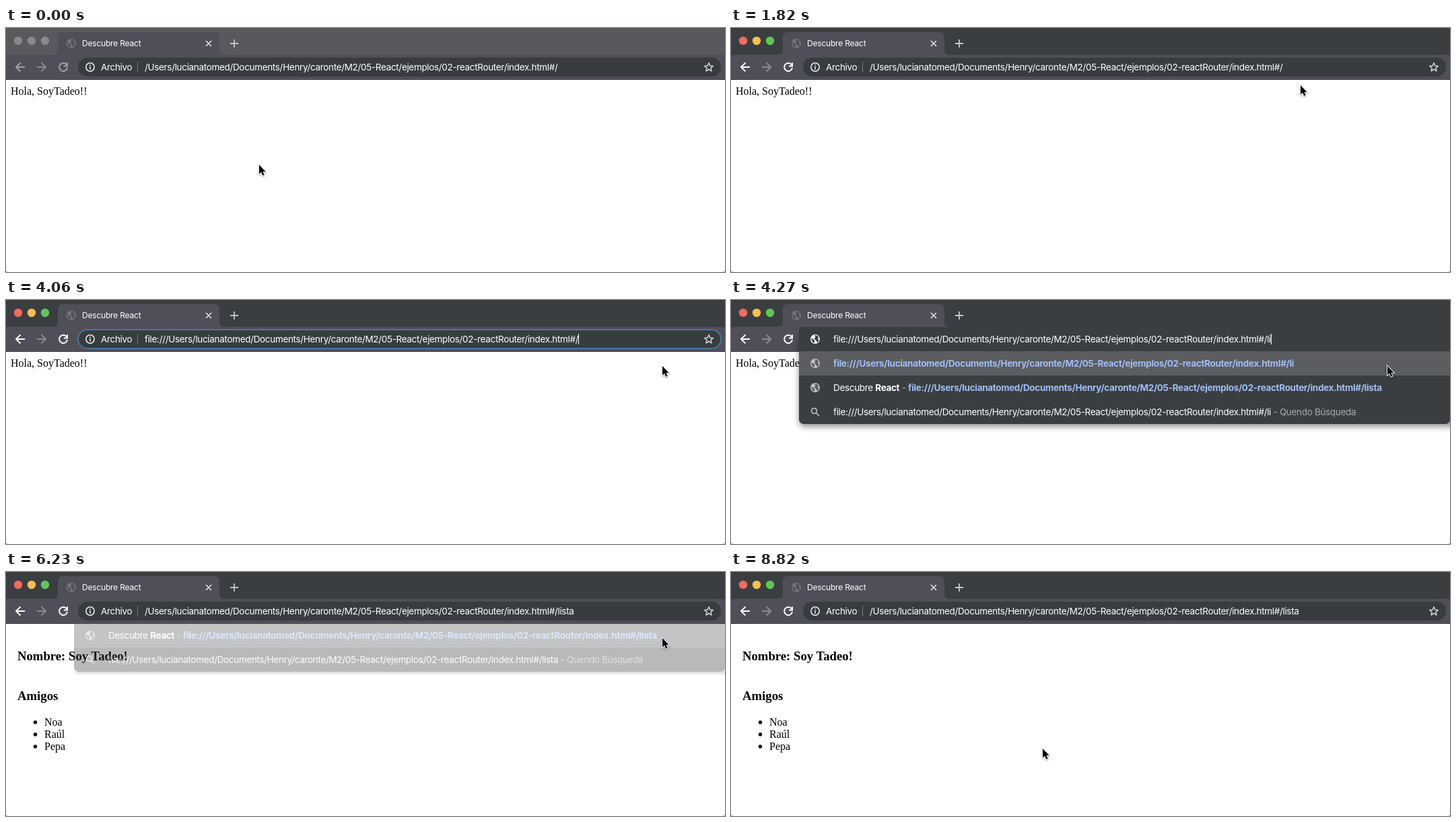
Write an HTML page that moves like this. It is 1068 by 362 pixels and loops after 8960 ms.

```html
<!DOCTYPE html>
<html lang="es">
<head>
<meta charset="utf-8">
<title>Descubre React</title>
<style>
html, body { margin: 0; width: 100%; height: 100%; overflow: hidden; background: #fff; }
svg { display: block; width: 1068px; height: 362px; }
text { white-space: pre; }
.ui { font: 400 13.5px Inter, sans-serif; letter-spacing: -.33px; fill: #fff; }
.tab { font-size: 12px; letter-spacing: -.2px; }
.bold { font-weight: 700; }
.link { fill: #a0bdf6; }
.dim { fill: #a9abad; }
.page { font: 16px "Liberation Serif", serif; }
.page .head { font-weight: bold; font-size: 18.72px; }
.line { fill: none; stroke-width: 2; }
</style>
</head>
<body>
<svg viewBox="0 0 1068 362">
  <defs>
    <filter id="blur" x="-10%" y="-20%" width="120%" height="160%"><feGaussianBlur stdDeviation="5"/></filter>
    <g id="globe">
      <circle r="7"/>
      <path fill="var(--land)" d="M-5.6 -1.5L-2.6 .4 -.6 2.4 -1.3 5.5Q-5.6 4.5 -5.6 -1.5ZM-1 -5.7Q3.5 -6 5 -2.5L3.4 -.8 5.6 1.2Q5 4 3 5L1.5 1.8 -1.6 -.6 .6 -2.8Z"/>
    </g>
  </defs>

  <g class="page">
    <text id="hello" x="7" y="99">Hola, SoyTadeo!!</text>
    <g id="list">
      <text class="head" x="17" y="131">Nombre: Soy Tadeo!</text>
      <text class="head" x="17" y="190">Amigos</text>
    </g>
  </g>

  <rect id="strip" width="1068" height="40"/>
  <g id="lights"></g>
  <path fill="#504e58" d="M0 40H69Q77 40 77 32V14Q77 6 85 6H309Q317 6 317 14V32Q317 40 325 40H1068V77H0Z"/>
  <path fill="#414148" d="M0 76H1068V77H0Z"/>
  <use href="#globe" x="97" y="23" fill="#75747b" style="--land:#504e58"/>
  <text class="ui tab" x="113" y="27">Descubre React</text>
  <path class="line" stroke="#e4e4e6" style="stroke-width:1.6" d="M297 19l8 8M305 19l-8 8"/>
  <path class="line" stroke="#c4c6c8" style="stroke-width:1.8" d="M333 23h12M339 17v12"/>
  <g id="nav" class="line">
    <path d="M28 58H15M21.5 51.5L15 58l6.500 6.500"/>
    <path d="M90 54.500A6 6 0 1 0 91 59M91 51.500v5h-5"/>
  </g>
  <path class="line" stroke="#8b8991" d="M46 58H59M52.500 51.500L59 58l-6.500 6.500"/>

  <rect id="box" x="107" y="44" width="955" height="28" rx="14" fill="#383c3f" stroke-width="2"/>
  <g id="info">
    <circle class="line" cx="125" cy="58" r="6.200" stroke="#f0f0f0" style="stroke-width:1.500"/>
    <path fill="#f0f0f0" d="M124.200 57h1.600v4.500h-1.600zM124.200 54.200h1.600v1.600h-1.600z"/>
    <text class="ui" x="141" y="63">Archivo</text>
    <path fill="#77797c" d="M195 50h1v16h-1z"/>
    <path class="line" stroke="#d3d4d5" style="stroke-width:1.500" stroke-linejoin="round" d="M1044 51.800l1.800 4.200 4.600.4-3.500 3 1.100 4.500-4-2.400-4 2.400 1.100-4.500-3.500-3 4.600-.4z"/>
  </g>
  <text id="url" class="ui" x="206" y="63"></text>

  <g id="drop">
    <rect class="panel" x="101" y="54" width="975" rx="7" fill="#000" opacity=".42" filter="url(#blur)"/>
    <rect class="panel" x="101" y="40" width="967" rx="7" fill="#3a3e41"/>
    <rect x="101" y="76" width="967" height="36" fill="#5b5d60"/>
    <g id="typed">
      <use href="#globe" x="125" y="94" fill="#bdc0c2" style="--land:#5b5d60"/>
      <text class="ui bold link" x="152" y="99"></text>
    </g>
    <g id="match">
      <use href="#globe" x="125" y="94" fill="#bdc0c2" style="--land:#5b5d60"/>
      <text class="ui" x="152" y="99">Descubre <tspan class="bold">React</tspan><tspan class="dim"> - </tspan><tspan id="found" class="bold link"></tspan></text>
    </g>
    <g id="search">
      <path class="line" stroke="#bdc0c2" style="stroke-width:1.700" d="M126.800 131.800l4.200 4.200M123.500 124.500a4 4 0 1 0 .01 0"/>
      <text class="ui" x="152" y="135"><tspan id="query"></tspan><tspan class="dim"> - Quendo Búsqueda</tspan></text>
    </g>
  </g>
  <g id="edit">
    <rect x="101" y="40" width="967" height="36" fill="#3a3e41"/>
    <use href="#globe" x="125" y="58" fill="#f4f4f4" style="--land:#3a3e41"/>
    <text id="input" class="ui" x="152" y="63"></text>
  </g>
  <path id="caret" fill="#fff" d="M0 50h1v16h-1z"/>

  <path fill="#9a9a9a" d="M0 360v2h2zM1068 360v2h-2z"/>
  <g id="mouse">
    <path id="arrow" d="M0 0V13.600L3.100 10.800 5.300 15.800 7.600 14.800 5.500 9.900H9.600Z" stroke="#fff" stroke-width="1.800" paint-order="stroke" style="filter:drop-shadow(0 1px 1px #0006)"/>
    <path id="beam" class="line" stroke="#fff" style="stroke-width:1.200" d="M-3 -8Q0 -8 0 -6V6Q0 8 -3 8M3 -8Q0 -8 0 -6M0 6Q0 8 3 8"/>
  </g>
</svg>
<script>
const LOOP = 8960, STEP = 70;
const PATH = "/Users/lucianatomed/Documents/Henry/caronte/M2/05-React/ejemplos/02-reactRouter/index.html#/";
const WORD = "lista", FULL = "file://" + PATH;
const FOCUS = 2240, ENTER = 6095, FADE = 210;
const KEYS = [4130, 4270, 4340, 4480, 4550];

// time, x, y of the pointer
const TRACK = [
  [0, 376, 203], [140, 376, 208], [210, 376, 204], [840, 376, 204],
  [1190, 226, 202], [1680, 876, 73], [1820, 846, 85], [1890, 846, 85],
  [2240, 900, 60], [2800, 905, 60], [3290, 975, 98], [7000, 975, 98],
  [7070, 962, 124], [7490, 300, 262], [7770, 120, 235], [7840, 120, 235],
  [8120, 110, 125], [8470, 105, 250], [8750, 429, 248], [8820, 463, 262],
  [LOOP, 463, 262]
];

const $ = id => document.getElementById(id);
const show = (id, on) => { $(id).style.display = on ? "" : "none"; };
const set = (id, attrs) => { for (const k in attrs) $(id).setAttribute(k, attrs[k]); };

$("lights").innerHTML = [18, 38, 58].map(x => `<circle cx="${x}" cy="19" r="6.200"/>`).join("");
$("list").innerHTML += ["Noa", "Raúl", "Pepa"].map((name, i) =>
  `<circle cx="43.500" cy="${223 + 18 * i}" r="2.700"/><text x="57" y="${228 + 18 * i}">${name}</text>`).join("");
$("found").textContent = FULL + WORD;

// smooth curve through the track, without overshoot
function along(t, axis) {
  let i = 0;
  while (i < TRACK.length - 2 && TRACK[i + 1][0] <= t) i++;
  const slope = j => j < 0 || j > TRACK.length - 2 ? 0
    : (TRACK[j + 1][axis] - TRACK[j][axis]) / (TRACK[j + 1][0] - TRACK[j][0]);
  const tangent = j => {
    const a = slope(j - 1), b = slope(j);
    return a * b > 0 ? 2 * a * b / (a + b) : 0;
  };
  const [a, b] = [TRACK[i], TRACK[i + 1]], d = b[0] - a[0], u = (t - a[0]) / d;
  const w = u * u * (3 - 2 * u);
  return a[axis] + (b[axis] - a[axis]) * w
    + d * u * (1 - u) * ((1 - u) * tangent(i) - u * tangent(i + 1));
}

function draw(time) {
  const t = Math.floor(time % LOOP / STEP) * STEP;
  const active = t >= 70, focus = t >= FOCUS && t < ENTER, loaded = t >= ENTER;
  const count = KEYS.filter(k => t >= k).length;
  const typing = count > 0 && !loaded, done = count === WORD.length;
  const text = FULL + WORD.slice(0, count);

  set("strip", { fill: active ? "#3a3e41" : "#57595c" });
  set("nav", { stroke: active ? "#fff" : "#a3a1a8" });
  [...$("lights").children].forEach((c, i) =>
    c.setAttribute("fill", active ? ["#f4695f", "#f6be4f", "#61c655"][i] : "#88898b"));

  show("hello", !loaded);
  show("list", loaded);
  show("info", !typing);
  set("box", { stroke: focus ? "#48789a" : "none" });
  $("url").textContent = loaded ? PATH + WORD : focus ? FULL : PATH;
  show("url", !typing);

  const fade = loaded ? Math.max(0, 1 - (t - ENTER) / FADE) : 1;
  show("drop", count > 0 && fade > 0);
  set("drop", { opacity: fade, "clip-path": loaded ? "inset(76px 0 0 0)" : "none" });
  $("drop").style.clipPath = loaded ? "polygon(0 36px, 100% 36px, 100% 100%, 0 100%)" : "";
  const rows = done ? 2 : 3;
  document.querySelectorAll(".panel").forEach((r, i) => r.setAttribute("height", 36 * (rows + 1) - (i ? 0 : 10)));
  show("typed", !done);
  document.querySelector("#typed text").textContent = text;
  const shift = { transform: `translate(0 ${done ? 0 : 36})` };
  set("match", shift);
  set("search", shift);
  $("query").textContent = text;

  show("edit", typing);
  $("input").textContent = text;
  const field = $(typing ? "input" : "url");
  const blink = Math.floor((t - (done ? 4550 : 3990)) / 560) % 2 === 0 || (typing && !done);
  show("caret", focus && blink);
  if (focus) set("caret", { transform: `translate(${Math.round(+field.getAttribute("x") + field.getComputedTextLength())} 0)` });

  const x = along(t, 1), y = along(t, 2), overField = y > 44 && y < 72 && x > 196;
  set("mouse", { transform: `translate(${x.toFixed(1)} ${y.toFixed(1)})` });
  show("arrow", !overField);
  show("beam", overField);
}

const start = performance.now();
function tick() {
  draw(performance.now() - start);
  requestAnimationFrame(tick);
}
draw(0);
tick();
</script>
</body>
</html>
```
